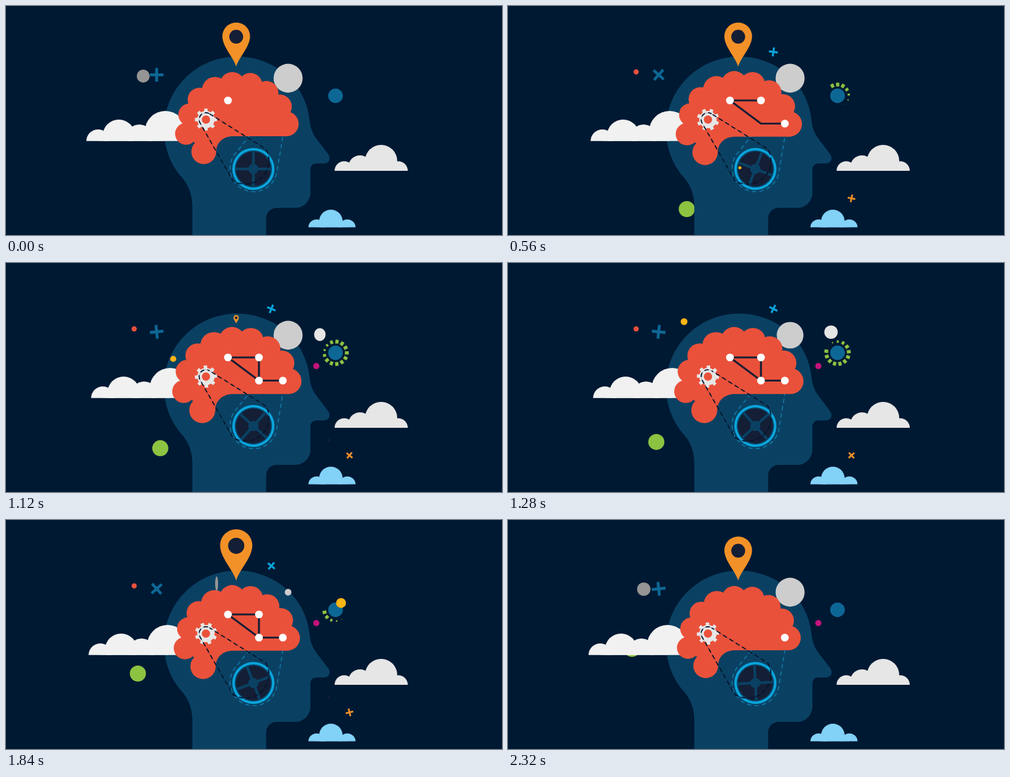
An HTML page with a canvas that plays this animation: 800x371 px, repeating every 2.4 s.

```html
<!DOCTYPE html>
<html lang="en">
<head>
<meta charset="utf-8">
<title>Thinking head</title>
<style>
  html, body { margin: 0; width: 100%; height: 100%; overflow: hidden; background: #001933; }
  canvas { display: block; width: 100vw; height: 100vh; }
</style>
</head>
<body>
<canvas id="stage"></canvas>
<script>
const W = 800, H = 371, LOOP = 2400, STEP = 80, TAU = Math.PI * 2;
const C = {
  bg: '#001933', head: '#0a4163', brain: '#ea513a', ink: '#141e35', teal: '#0d6795',
  cyan: '#0aa5dc', orange: '#f29127', yellow: '#fdb515', green: '#8cc341',
  pink: '#c4137c', white: '#f1f1f1', pale: '#e6e6e6', moon: '#cdcdcd', sky: '#82d1f7'
};

const canvas = document.getElementById('stage');
const ctx = canvas.getContext('2d');
const dpr = window.devicePixelRatio || 1;
canvas.width = W * dpr;
canvas.height = H * dpr;

const rad = deg => deg * Math.PI / 180;
const ramp = (t, a, b) => Math.min(1, Math.max(0, (t - a) / (b - a)));
const smooth = p => p * p * (3 - 2 * p);
const ease = (t, a, b) => smooth(ramp(t, a, b));
// Grows during a..b and shrinks during c..d
const show = (t, a, b, c, d) => ease(t, a, b) * (1 - ease(t, c, d));

// Smooth curve through rows of [time, value, value, ...]
function spline(keys, t) {
  let i = 0;
  while (i < keys.length - 2 && t >= keys[i + 1][0]) i++;
  const at = k => keys[Math.min(keys.length - 1, Math.max(0, k))];
  const p = at(i), q = at(i + 1), before = at(i - 1), after = at(i + 2);
  const h = q[0] - p[0], u = (t - p[0]) / h, u2 = u * u, u3 = u2 * u;
  return p.slice(1).map((_, n) => {
    const k = n + 1;
    const m0 = (q[k] - before[k]) / (q[0] - before[0]);
    const m1 = (after[k] - p[k]) / (after[0] - p[0]);
    return (2 * u3 - 3 * u2 + 1) * p[k] + (u3 - 2 * u2 + u) * h * m0
      + (3 * u2 - 2 * u3) * q[k] + (u3 - u2) * h * m1;
  });
}

function oval(x, y, rx, ry, color) {
  if (rx <= 0 || ry <= 0) return;
  ctx.fillStyle = color;
  ctx.beginPath();
  ctx.ellipse(x, y, rx, ry, 0, 0, TAU);
  ctx.fill();
}
const dot = (x, y, r, color) => oval(x, y, r, r, color);

function place(x, y, deg, scale, draw) {
  if (scale <= 0) return;
  ctx.save();
  ctx.translate(x, y);
  ctx.rotate(rad(deg));
  ctx.scale(scale, scale);
  draw();
  ctx.restore();
}

function plus(x, y, half, width, deg, scale, color) {
  place(x, y, deg, scale, () => {
    ctx.fillStyle = color;
    ctx.fillRect(-half, -width / 2, half * 2, width);
    ctx.fillRect(-width / 2, -half, width, half * 2);
  });
}

function cloud(base, color, bumps, dx = 0) {
  ctx.save();
  ctx.beginPath();
  ctx.rect(0, 0, W, base);
  ctx.clip();
  for (const [x, y, r] of bumps) dot(x + dx, y, r, color);
  ctx.fillStyle = color;
  const first = bumps[0], last = bumps[bumps.length - 1];
  ctx.fillRect(first[0] + dx, base - 8, last[0] - first[0], 8);
  ctx.restore();
}

const leftCloud = [[148.5, 219, 19], [182, 210, 26], [215, 213, 21], [257, 203, 33]];
const rightCloud = [[545.5, 267, 15.5], [571, 261, 19], [605, 251, 26], [632.5, 267, 15.5]];
const blueCloud = [[501, 359, 13.3], [524, 349, 19], [550.5, 359, 13.3]];
const lobes = [
  [319, 236, 20], [290.5, 207, 17.8], [296, 176, 18], [312, 151.5, 19], [337, 136, 21],
  [365, 127, 20], [394, 128, 19.5], [420, 141, 19.5], [441.5, 163, 19.5], [452, 191, 20]
];

const headShape = new Path2D(`M300.5 371V322C300 303 293 288 283 277C264 255 255 228 255 200
  C255 135 307 82 373 82C432 82 485 125 490 188C492 205 499 213 506 222L519.5 240
  C525 248 520 255 513 255H501C495 255 491 259 491 265V302C491 316 480 327 467 327H437
  C427 327 419.500 334 419.500 345V371Z`);
const brainGap = new Path2D(`M319 236L290 207L296 176L312 151L337 136L365 127L394 128L420 141
  L442 163L452 191V211H367C350 211 339.500 221 339 236Z`);
const pinShape = new Path2D(`M0 0C-5 -16 -22.300 -32 -22.300 -49A22.300 22.300 0 0 1 22.300 -49
  C22.300 -32 5 -16 0 0Z`);
const tealBelt = new Path2D('M394 209L369 240A38 38 0 1 0 436.500 271L447 209');
const darkBelt = new Path2D(`M328.400 174.700L419.200 231.800A38 38 0 0 1 366 282.800
  L312.900 189.400A11 11 0 0 1 328.400 174.700Z`);

function belt(path, color, width, shift) {
  ctx.strokeStyle = color;
  ctx.lineWidth = width;
  ctx.setLineDash([7, 5]);
  ctx.lineDashOffset = -shift;
  ctx.stroke(path);
  ctx.setLineDash([]);
}

function brain(scale) {
  ctx.save();
  ctx.translate(372.5, 181.5);
  ctx.scale(scale, scale);
  ctx.translate(-372.5, -181.5);
  ctx.fillStyle = C.brain;
  ctx.fill(brainGap);
  for (const [x, y, r] of lobes) dot(x, y, r, C.brain);
  ctx.restore();
}

function gear(deg) {
  place(322.5, 184, deg, 1, () => {
    dot(0, 0, 14, C.pale);
    ctx.fillStyle = C.pale;
    for (let i = 0; i < 8; i++) {
      ctx.fillRect(-2.8, -17.8, 5.6, 8);
      ctx.rotate(TAU / 8);
    }
    dot(0, 0, 6.7, C.brain);
  });
}

function wheel(deg) {
  place(399, 264, deg, 1, () => {
    dot(0, 0, 34, C.cyan);
    dot(0, 0, 30, C.head);
    dot(0, 0, 28, C.ink);
    plus(0, 0, 28.5, 4.4, 0, 1, C.head);
    dot(0, 0, 8.3, C.head);
  });
}

// Draws the part of a polyline between fractions a and b
function trim(points, a, b) {
  if (b <= a) return;
  let len = 0;
  ctx.beginPath();
  points.forEach(([x, y], i) => {
    ctx.lineTo(x, y);
    if (i) len += Math.hypot(x - points[i - 1][0], y - points[i - 1][1]);
  });
  ctx.strokeStyle = C.ink;
  ctx.lineWidth = 3.2;
  ctx.setLineDash([len * (b - a), len * 2]);
  ctx.lineDashOffset = -len * a;
  ctx.stroke();
  ctx.setLineDash([]);
}

function network(t) {
  const a = [358, 153], b = [408, 153], c = [408, 190.5], d = [446.5, 190.5];
  const gone = ramp(t, 1920, 2280);
  const upper = 0.575 * ramp(t, 160, 400) + 0.425 * ramp(t, 640, 920);
  trim([a, b, c], gone, upper);
  trim([a, c, d], gone, ramp(t, 160, 500));
  const node = (p, s) => dot(p[0], p[1], 6.3 * s, '#fff');
  node(a, 1 - ease(t, 1840, 1960));
  node(b, show(t, 360, 480, 2100, 2200));
  node(c, show(t, 900, 1040, 2120, 2240));
  node(d, ease(t, 440, 560));
}

function rays(t) {
  const n = 13;
  ctx.fillStyle = C.green;
  for (let i = 0; i < n; i++) {
    const s = Math.min(ramp(t, 106 + 71 * i, 390 + 71 * i), 1 - ramp(t, 1026 + 72 * i, 1310 + 72 * i));
    place(531.5, 145.5, -6 - 0.0375 * t + i * 360 / n, 1, () => {
      ctx.fillRect(-2.6 * s, -18.2 - 3.1 * s, 5.2 * s, 6.2 * s);
    });
  }
}

function pin(t) {
  const back = 1.18 * ease(t, 1700, 1850) - 0.18 * ease(t, 1850, 2000);
  place(371.3, 98, 0, t < 1300 ? 1 - ease(t, 940, 1190) : back, () => {
    ctx.fillStyle = C.orange;
    ctx.fill(pinShape);
    dot(0, -48.2, 11.2, C.ink);
  });
}

// A coin circling the head, white on one side and grey on the other
const coinTurn = [
  [-80, 180], [0, 190], [880, 300], [1280, 360], [1600, 419], [2000, 489], [2320, 540], [2400, 550]
];
function coin(t, front) {
  const a = rad(spline(coinTurn, t)[0]), s = Math.sin(a), c = Math.cos(a);
  if ((s > -0.02) !== front) return;
  const r = 10.8 + 1.2 * s;
  oval(370 + 151 * c, 112 - 9 * s, r * Math.abs(c), r, c > 0 ? C.pale : '#959595');
}

const sparkPath = [
  [400, 399, 264, 0], [560, 374, 262, 2.5], [880, 290, 244.5, 4], [1280, 284, 95, 5.5],
  [1600, 435, 36.5, 7], [2000, 593, 224, 8.6], [2160, 566, 333, 9], [2240, 527, 346, 9]
];
function spark(t) {
  if (t <= 400 || t >= 2240) return;
  const [x, y, r] = spline(sparkPath, t);
  dot(x, y, r, C.yellow);
}

function draw(t) {
  const breath = 0.5 * (1 - Math.abs(1 - t / 1200)) + 0.25 * (1 - Math.cos(TAU * t / LOOP));
  const turn = t * 90 / LOOP, shift = t * 60 / LOOP;
  ctx.setTransform(canvas.width / W, 0, 0, canvas.height / H, 0, 0);
  ctx.fillStyle = C.bg;
  ctx.fillRect(0, 0, W, H);

  coin(t, false);
  const roll = rad(101.6 + 0.0292 * t);
  dot(369 + 172 * Math.cos(roll), 177 + 172 * Math.sin(roll), 13, C.green);
  ctx.fillStyle = C.head;
  ctx.fill(headShape);

  cloud(218.7, C.white, leftCloud, 8 * breath);
  cloud(267, C.pale, rightCloud);
  dot(455, 117, 23.4 - 20.4 * show(t, 1180, 1720, 1720, 2280), C.moon);

  belt(tealBelt, '#1279a8', 1.6, -shift);
  brain(1 + 0.048 * breath);
  wheel(turn);
  gear(turn);
  ctx.strokeStyle = 'rgba(0,16,38,.35)';
  ctx.lineWidth = 0.7;
  ctx.stroke(darkBelt);
  belt(darkBelt, '#04142b', 1.8, shift);
  network(t);

  plus(243, 111.5, 11, 4.6, t * 180 / LOOP, 1, C.teal);
  plus(428, 74.3, 7.2, 3.2, 8 + 0.025 * (t - 560), show(t, 320, 520, 2120, 2320), C.cyan);
  plus(554, 311.7, 6.2, 2.8, 12 + 0.05 * (t - 560), show(t, 360, 540, 2060, 2240), C.orange);
  dot(206.7, 106.7, 4.2 * show(t, 280, 480, 2060, 2280), C.red || '#e9503a');
  dot(500.5, 167, 5 * ease(t, 640, 860), C.pink);
  const hole = show(t, 700, 880, 960, 1220) + show(t, 1380, 1580, 1680, 1920);
  dot(520.3, 287, 7.6 * hole, C.ink);

  dot(531.5, 145.5, 11.8, C.teal);
  rays(t);
  pin(t);
  coin(t, true);
  spark(t);
  cloud(358.6, C.sky, blueCloud);
}

function tick() {
  const t = performance.now() % LOOP;
  draw(Math.floor(t / STEP) * STEP);
  requestAnimationFrame(tick);
}
tick();
</script>
</body>
</html>
```
